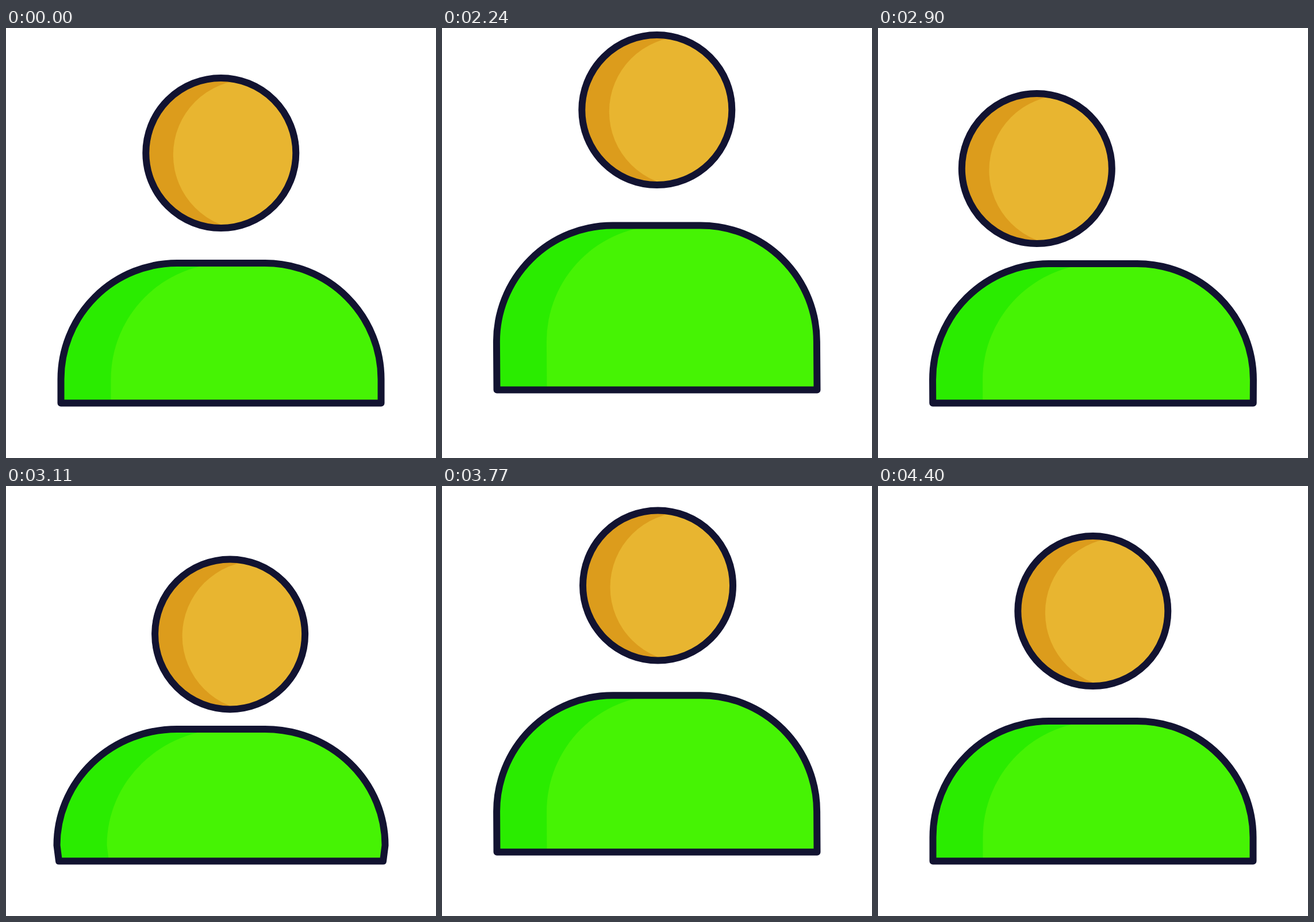
Write an HTML page that moves like this. It is 748 px wide and 748 px high and loops after 4.43 s.

```html
<!DOCTYPE html>
<html>
<head>
<meta charset="utf-8">
<style>
html, body { margin: 0; width: 100%; height: 100%; overflow: hidden; background: #fff; }
svg { display: block; width: 100%; height: 100%; }
</style>
</head>
<body>
<svg viewBox="0 0 748 748">
  <defs>
    <clipPath id="bodyClip"><path class="body"/></clipPath>
    <clipPath id="headClip"><circle r="130.5"/></clipPath>
  </defs>
  <path class="body" fill="#2aec00"/>
  <g clip-path="url(#bodyClip)"><path id="bodyLight" fill="#46f304"/></g>
  <path class="body" fill="none" stroke="#121331" stroke-width="12" stroke-linejoin="round"/>
  <g id="head">
    <circle r="130.5" fill="#dc9c1c"/>
    <g clip-path="url(#headClip)"><circle cx="47.5" cy="3" r="130.5" fill="#e8b530"/></g>
    <circle r="130.5" fill="none" stroke="#121331" stroke-width="12"/>
  </g>
</svg>
<script>
const LOOP = 4430, START = 2030, STEP = 30, RADIUS = 202;
const head = document.getElementById('head');
const light = document.getElementById('bodyLight');
const bodies = document.querySelectorAll('.body');

// Smooth 0 to 1 between two times.
function ease(t, from, to) {
  const p = Math.min(1, Math.max(0, (t - from) / (to - from)));
  return (1 - Math.cos(Math.PI * p)) / 2;
}

// Smooth 0 to 1 and back to 0.
const pulse = (t, from, peak, to) => ease(t, from, peak) - ease(t, peak, to);

function bodyPath(left, right, { top, bottom, bulge, lean }) {
  const side = top + RADIUS, rx = RADIUS + bulge, foot = bulge / 2;
  return `M${left - foot} ${bottom}L${left - bulge + lean} ${side}` +
    `A${rx} ${RADIUS} 0 0 1 ${left + RADIUS + lean} ${top}H${right - RADIUS + lean}` +
    `A${rx} ${RADIUS} 0 0 1 ${right + bulge + lean} ${side}L${right + foot} ${bottom}Z`;
}

function pose(t) {
  // Leap and drop to the left, swing to the right, leap back to the middle.
  const landing = pulse(t, 2300, 2480, 2660) + 2 * pulse(t, 4050, 4200, 4400);
  const swing = pulse(t, 2870, 3065, 3260);
  const stretch = pulse(t, 1993, 2240, 2470) + pulse(t, 3590, 3880, 4190);
  const lift = pulse(t, 1985, 2240, 2460) + pulse(t, 3590, 3880, 4240);
  return {
    x: 373.8 - 100 * ease(t, 2240, 2610) + 171 * ease(t, 2870, 3260) - 71 * ease(t, 3500, 3800),
    y: 217.5 + 26 * ease(t, 2240, 2600) - 2 * ease(t, 2870, 3260) - 24 * ease(t, 3560, 3870)
      - 75 * pulse(t, 1985, 2240, 2480) - 70 * pulse(t, 3590, 3870, 4162)
      + 6 * landing + 18 * swing,
    top: 409 - 65.5 * stretch + 4 * landing + 16 * swing,
    bottom: 652.5 - 23 * lift,
    bulge: 8 * swing,
    lean: -0.6 * stretch
  };
}

function draw(now) {
  const elapsed = now % LOOP;
  const t = elapsed < START ? 0 : START + Math.floor((elapsed - START) / STEP) * STEP;
  const state = pose(t);
  const outline = bodyPath(95.5, 652.5, state);
  bodies.forEach(body => body.setAttribute('d', outline));
  light.setAttribute('d', bodyPath(182.5, 900, state));
  head.setAttribute('transform', `translate(${state.x} ${state.y})`);
  requestAnimationFrame(draw);
}
draw(performance.now());
</script>
</body>
</html>
```
